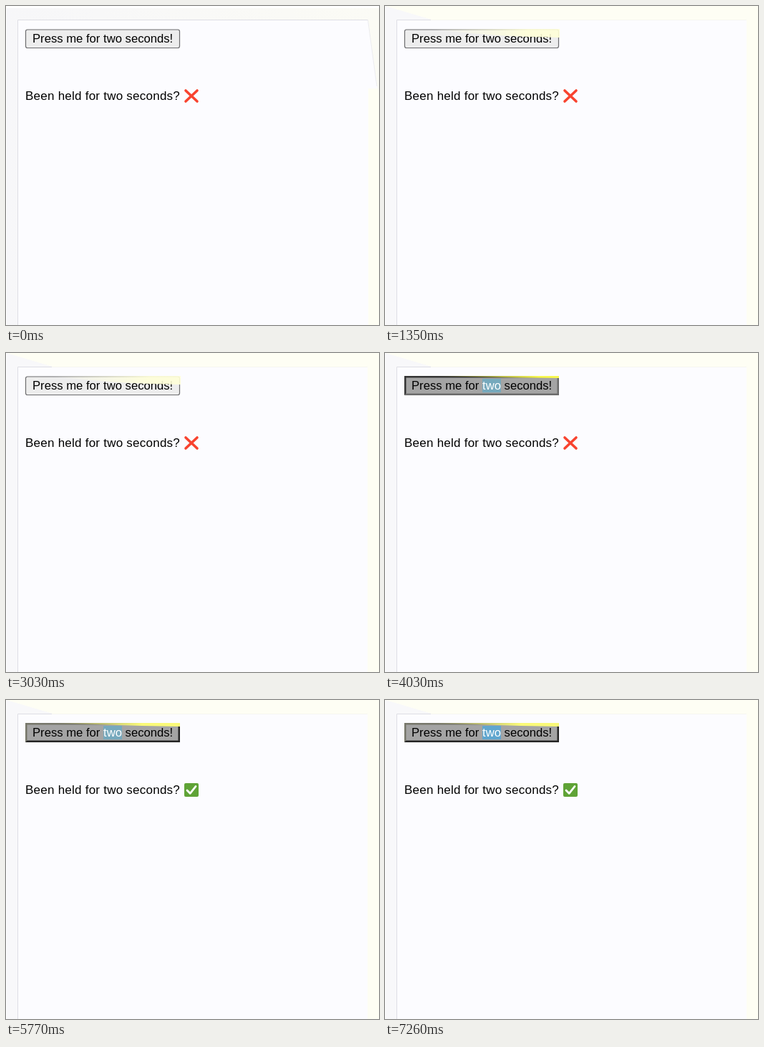
An HTML page with a canvas that plays this animation: 521 by 445 pixels, repeating every 7620 ms.

```html
<!DOCTYPE html>
<html lang="en">
<head>
<meta charset="utf-8">
<title>Long press button</title>
<style>
html, body { margin: 0; width: 100%; height: 100%; overflow: hidden; background: #fff; }
canvas { display: block; width: 521px; height: 445px; }
</style>
</head>
<body>
<canvas id="stage" width="521" height="445"></canvas>
<script>
const ctx = document.getElementById('stage').getContext('2d');
const LOOP = 7620, SETTLE = 150, PRESS = 4030, RELEASE = 5220, REFRESH = 7260;
const BTN = { x: 27, y: 32, w: 216, h: 27 };
const LABEL = ['Press me for ', 'two', ' seconds!'];
const SANS = '"Liberation Sans", Arial, sans-serif';

function poly(color, ...pts) {
  ctx.fillStyle = color;
  ctx.beginPath();
  for (let i = 0; i < pts.length; i += 2) ctx.lineTo(pts[i], pts[i + 1]);
  ctx.closePath();
  ctx.fill();
}

function rect(color, x, y, w, h) {
  ctx.fillStyle = color;
  ctx.fillRect(x, y, w, h);
}

function line(color, width, ...pts) {
  ctx.strokeStyle = color;
  ctx.lineWidth = width;
  ctx.beginPath();
  for (let i = 0; i < pts.length; i += 2) ctx.lineTo(pts[i], pts[i + 1]);
  ctx.stroke();
}

function fade(x0, x1, from, to) {
  const g = ctx.createLinearGradient(x0, 0, x1, 0);
  g.addColorStop(0, from);
  g.addColorStop(1, to);
  return g;
}

function page(settled) {
  rect('#fff', 0, 0, 521, 445);
  if (settled) {
    rect('#fefef4', 1, 0, 520, 445);
    poly('#f8f8fa', 1, 0, 65, 19, 17, 19, 17, 445, 1, 445);
    rect('#fcfcff', 17, 20, 488, 425);
    line('#dedee4', 1, 16.5, 445, 16.5, 19.5, 64, 19.5);
    line('#f6f6f0', 1, 64, 19.5, 505, 19.5);
  } else {
    rect(fade(0, 521, '#f7f7f9', '#fbfbf5'), 1, 3, 520, 442);
    poly('#fefef4', 506, 19, 521, 125, 521, 445, 506, 445);
    rect('#fcfcff', 17, 20, 489, 425);
    poly('#fcfcff', 505, 20, 519, 115, 505, 115);
    line('#dedee4', 1, 16.5, 445, 16.5, 19.5, 505.5, 19.5);
    line('#ececf0', 1, 505.5, 19.5, 518, 112);
  }
}

function label(selected, selColor) {
  ctx.font = '16.667px ' + SANS;
  const start = 37 + ctx.measureText(LABEL[0]).width;
  const width = ctx.measureText(LABEL[1]).width;
  if (selected) rect(selColor, start, 36, width, 19);
  ctx.fillStyle = '#000';
  ctx.fillText(LABEL[0], 37, 51);
  ctx.fillText(LABEL[2], start + width, 51);
  ctx.fillStyle = selected ? '#fff' : '#000';
  ctx.fillText(LABEL[1], start, 51);
}

// pale wedge washing over the upper right of the button
function wash() {
  ctx.fillStyle = fade(60, 200, '#ffffe800', '#ffffd8e8');
  ctx.beginPath();
  ctx.moveTo(60, 32);
  ctx.lineTo(244, 32);
  ctx.lineTo(244, 44);
  ctx.quadraticCurveTo(150, 43, 60, 32);
  ctx.fill();
}

function idleButton(settled) {
  const { x, y, w, h } = BTN;
  ctx.beginPath();
  ctx.roundRect(x + .5, y + 1, w - 1, h - 1.5, 2.5);
  ctx.fillStyle = '#ededed';
  ctx.fill();
  ctx.strokeStyle = '#6c6c6e';
  ctx.lineWidth = 1.2;
  ctx.stroke();
  label(false);
  if (settled) wash();
}

function heldButton(down, selColor) {
  const { x, y, w, h } = BTN, r = x + w, b = y + h, e = 2.5;
  const lit = down ? '#343434' : '#77776a';
  const dark = down ? '#6c6c6c' : '#262626';
  rect('#a4a4a4', x, y, w, h);
  poly(lit, x, y, r, y, r - e, y + e, x + e, y + e, x + e, b - e, x, b);
  poly(dark, r, b, x, b, x + e, b - e, r - e, b - e, r - e, y + e, r, y);
  const glow = down ? fade(60, 215, '#f4f45000', '#f8f850')
                    : fade(60, 190, '#f4f47000', '#fafa78');
  poly(glow, 60, 32, r, 32, r, down ? 35 : 37, 190, down ? 34.4 : 36);
  label(true, selColor);
}

function question() {
  ctx.font = '17px ' + SANS;
  ctx.letterSpacing = '0.24px';
  ctx.fillStyle = '#000';
  ctx.fillText('Been held for two seconds?', 27, 131);
  ctx.letterSpacing = '0px';
}

function cross() {
  ctx.lineCap = 'round';
  line('#f8432f', 3.6, 251, 118, 267, 133);
  line('#f8432f', 3.6, 267, 118, 251, 133);
  ctx.lineCap = 'butt';
}

function check() {
  ctx.fillStyle = '#5fa336';
  ctx.beginPath();
  ctx.roundRect(249, 116, 20, 19, 2);
  ctx.fill();
  ctx.lineCap = ctx.lineJoin = 'round';
  line('#fff', 2.8, 253, 126, 257.2, 130.3, 265, 120.5);
  ctx.lineCap = 'butt';
  ctx.lineJoin = 'miter';
}

function draw(t) {
  page(t >= SETTLE);
  if (t < PRESS) idleButton(t >= SETTLE);
  else heldButton(t < RELEASE, t < REFRESH ? '#76a9bd' : '#60a6cf');
  question();
  if (t < RELEASE) cross();
  else check();
}

const begin = performance.now();
function tick() {
  draw((performance.now() - begin) % LOOP);
  requestAnimationFrame(tick);
}
tick();
</script>
</body>
</html>
```
